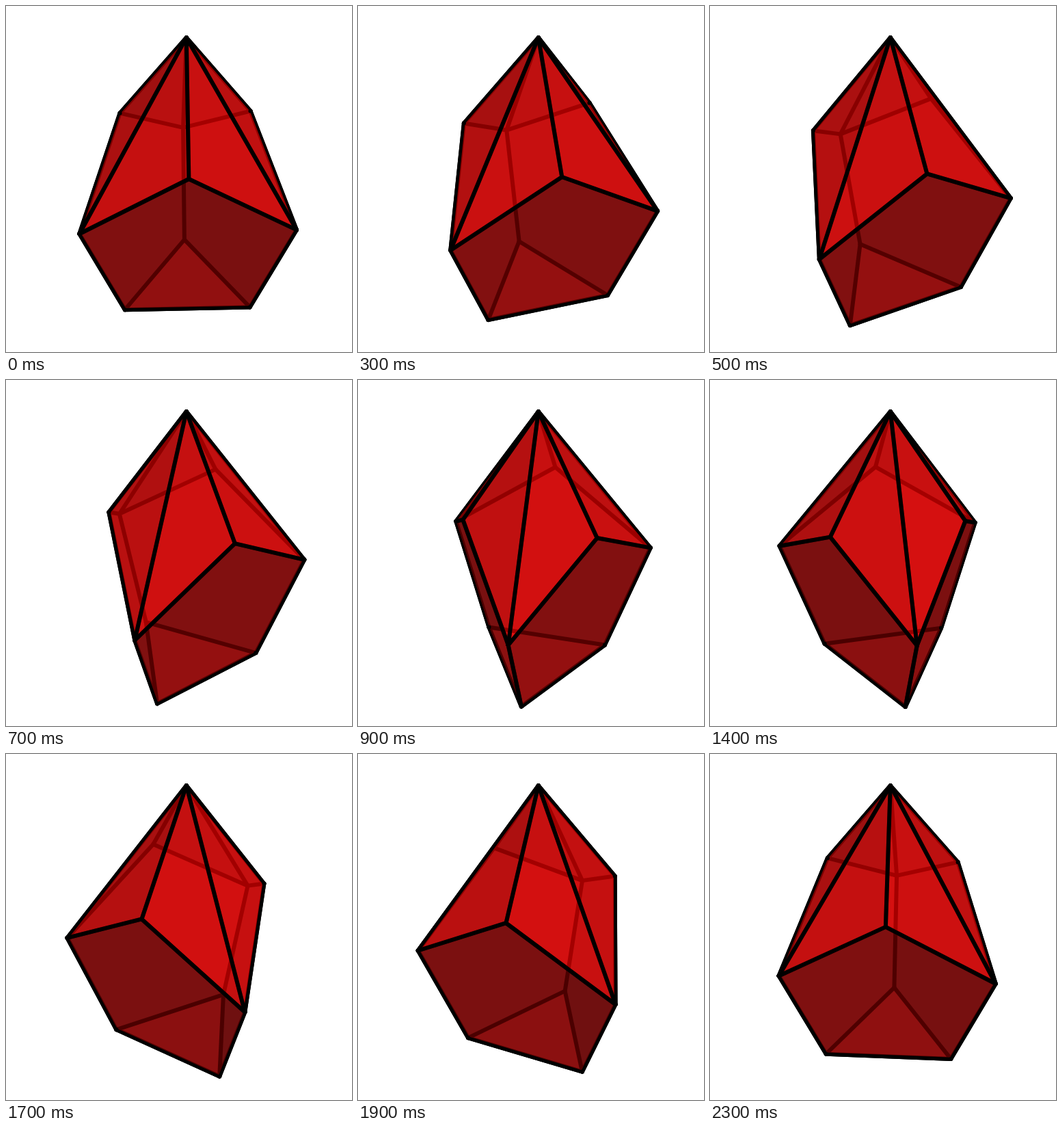
An HTML page with a canvas that plays this animation: 506x506 px, repeating every 2400 ms.

```html
<!DOCTYPE html>
<html lang="en">
<head>
<meta charset="utf-8">
<title>Turning polyhedron</title>
<style>
  html, body { margin: 0; width: 100%; height: 100%; overflow: hidden; background: #fff; }
  canvas { display: block; width: 506px; height: 506px; }
</style>
</head>
<body>
<canvas id="stage" width="506" height="506"></canvas>
<script>
const ctx = document.getElementById('stage').getContext('2d');
const RAD = Math.PI / 180;
const STEPS = 24, STEP_MS = 100, STEP_DEG = 5, START_DEG = 1.7;
const CX = 263.8, CY = 253, FOCAL = 1612;
const SIN = 0.592, COS = 0.806;           // camera tilt
const ROD = 3;                            // edge radius
const ALPHA = 0.75;
const AMBIENT = 100, LIGHT = [22, 38, 160];

// Vertices as [radius, angle, height]: apex, three high, three low, three base.
const ring = (r, start, z) => [0, 1, 2].map(i => [r, start + 120 * i, z]);
const verts = [[0, 0, 234.5], ...ring(110, 0, 80.8), ...ring(177.2, 60, -27.6), ...ring(110.6, 60, -205.5)];

const faces = [[7, 8, 9]];
for (let i = 0; i < 3; i++) {
  const high = 1 + i, next = 1 + (i + 1) % 3;
  const low = 4 + i, prev = 4 + (i + 2) % 3;
  faces.push([0, high, low], [0, low, next], [high, low, low + 3, prev + 3, prev]);
}

const edges = new Map();
faces.forEach((face, f) => face.forEach((a, i) => {
  const b = face[(i + 1) % face.length];
  const key = Math.min(a, b) + '-' + Math.max(a, b);
  if (!edges.has(key)) edges.set(key, { a, b, sides: [] });
  edges.get(key).sides.push(f);
}));

const sub = (a, b) => a.map((v, i) => v - b[i]);
const dot = (a, b) => a.reduce((sum, v, i) => sum + v * b[i], 0);
const cross = (a, b) => [a[1] * b[2] - a[2] * b[1], a[2] * b[0] - a[0] * b[2], a[0] * b[1] - a[1] * b[0]];
const mean = pts => pts[0].map((_, i) => pts.reduce((sum, p) => sum + p[i], 0) / pts.length);

function outward(pts) {
  const n = cross(sub(pts[1], pts[0]), sub(pts[2], pts[0]));
  const len = Math.hypot(...n) * Math.sign(dot(n, mean(pts)));
  return n.map(v => v / len);
}

// World axes: right, toward the viewer, up.
function place([r, angle, z], turn) {
  const t = (angle + turn) * RAD;
  return [r * Math.sin(t), r * Math.cos(t), z];
}

function project([x, y, z]) {
  const k = FOCAL / (FOCAL - y * COS - z * SIN);
  return [CX + x * k, CY + (y * SIN - z * COS) * k];
}

function viewDot(n, point) {
  const eye = sub([0, FOCAL * COS, FOCAL * SIN], point);
  return dot(n, eye) / Math.hypot(...eye);
}

function fillFace(face, pts) {
  const side = face.facing > 0 ? 1 : -1;
  const lit = Math.max(0, side * dot(face.normal, LIGHT));
  const red = Math.min(255, Math.round(AMBIENT + lit));
  ctx.fillStyle = `rgba(${red},0,0,${ALPHA})`;
  ctx.beginPath();
  face.ids.forEach(i => ctx.lineTo(...pts[i]));
  ctx.closePath();
  ctx.fill();
}

function line(p, q, width) {
  ctx.lineWidth = width;
  ctx.beginPath();
  ctx.moveTo(...p);
  ctx.lineTo(...q);
  ctx.stroke();
}

// On the outline the front face hides part of the rod's inner half.
function outlineEdge(p, q, face, pts) {
  const dx = q[0] - p[0], dy = q[1] - p[1], len = Math.hypot(dx, dy);
  let n = [dy / len, -dx / len];
  const inner = mean(face.ids.map(i => pts[i]));
  if (dot(n, sub(inner, p)) > 0) n = n.map(v => -v);
  const shift = ROD * (1 - face.facing) / 2;
  const move = pt => [pt[0] + n[0] * shift, pt[1] + n[1] * shift];
  line(move(p), move(q), ROD * (1 + face.facing));
}

function draw(step) {
  const turn = START_DEG + STEP_DEG * step;
  const world = verts.map(v => place(v, turn));
  const pts = world.map(project);
  const solid = faces.map(ids => {
    const corners = ids.map(i => world[i]);
    const normal = outward(corners);
    return { ids, normal, facing: viewDot(normal, corners[0]) };
  });
  const front = solid.filter(f => f.facing > 0);

  ctx.fillStyle = '#fff';
  ctx.fillRect(0, 0, 506, 506);
  ctx.strokeStyle = '#000';
  ctx.lineCap = 'round';

  solid.filter(f => f.facing <= 0).forEach(f => fillFace(f, pts));
  edges.forEach(({ a, b }) => line(pts[a], pts[b], 2 * ROD));
  front.forEach(f => fillFace(f, pts));

  edges.forEach(({ a, b, sides }) => {
    const seen = sides.map(i => solid[i]).filter(f => f.facing > 0);
    if (seen.length === 2) line(pts[a], pts[b], 2 * ROD);
    else if (seen.length === 1) outlineEdge(pts[a], pts[b], seen[0], pts);
  });

  ctx.fillStyle = '#000';
  new Set(front.flatMap(f => f.ids)).forEach(i => {
    ctx.beginPath();
    ctx.arc(...pts[i], ROD, 0, 2 * Math.PI);
    ctx.fill();
  });
}

const begin = performance.now();
function tick() {
  draw(Math.floor((performance.now() - begin) / STEP_MS) % STEPS);
  requestAnimationFrame(tick);
}
tick();
</script>
</body>
</html>
```
